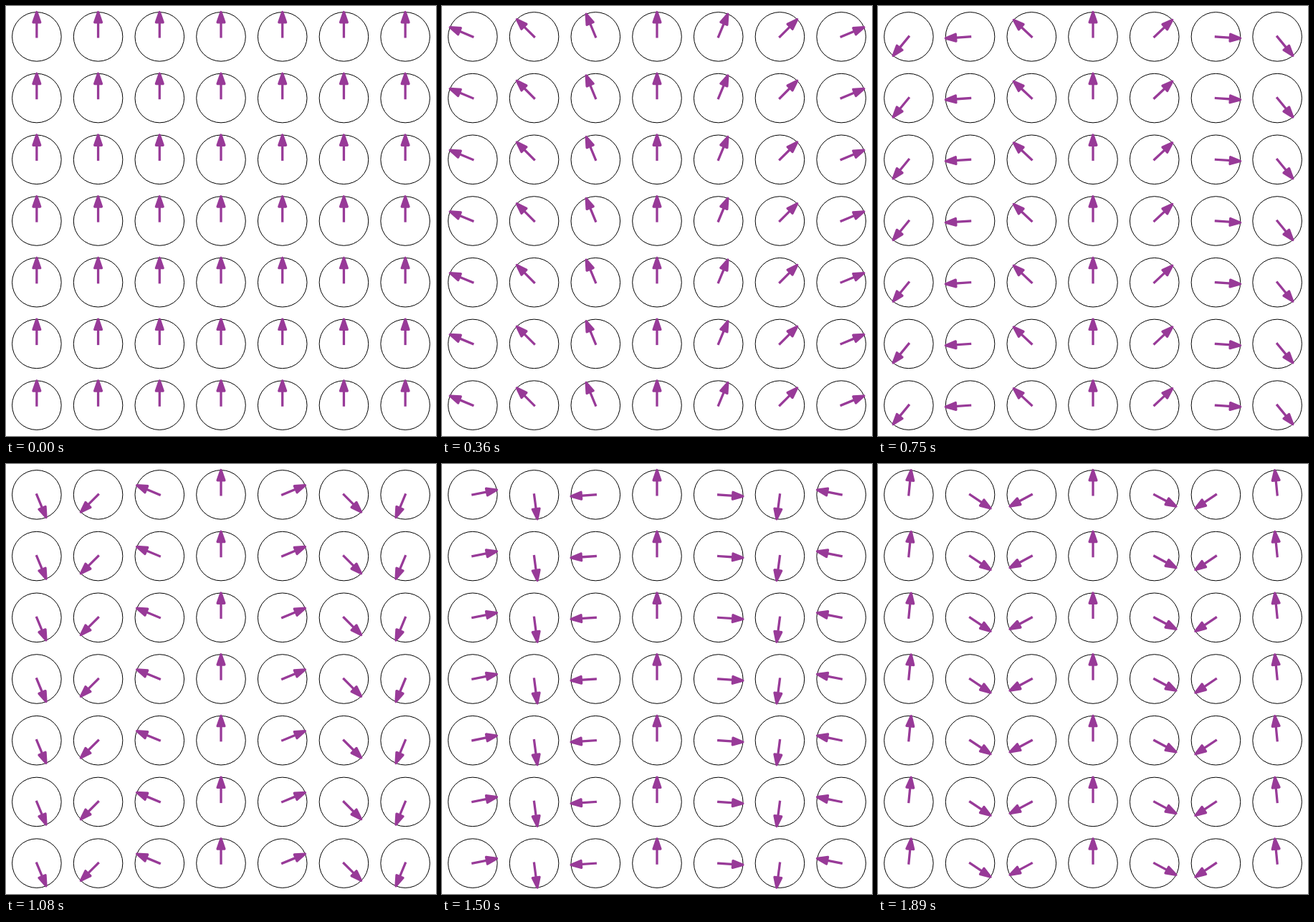
These frames come from a looping animation (600x600 px, 1920 ms). An HTML page with a canvas:

```html
<!DOCTYPE html>
<html lang="en">
<head>
<meta charset="utf-8">
<title>Rotating arrows</title>
<style>
html, body { margin: 0; width: 100%; height: 100%; overflow: hidden; background: #fff; }
canvas { display: block; width: 600px; height: 600px; }
</style>
</head>
<body>
<canvas id="stage" width="600" height="600"></canvas>
<script>
const ctx = document.getElementById('stage').getContext('2d');
const SIZE = 600, COUNT = 7, CELL = SIZE / COUNT, RADIUS = CELL * 0.4;
const STEP = 30, STEPS = 64;
const TURN = 2 * Math.PI / 3; // phase gained per column in one loop
const HEAD_BASE = 20, HEAD_HALF = 4.9;

function drawCircle() {
  ctx.beginPath();
  ctx.arc(0, 0, RADIUS, 0, 2 * Math.PI);
  ctx.lineWidth = 1;
  ctx.strokeStyle = '#000';
  ctx.stroke();
}

function drawArrow(angle) {
  ctx.rotate(angle);
  ctx.lineWidth = 3.3;
  ctx.lineCap = 'square';
  ctx.lineJoin = 'round';
  ctx.strokeStyle = ctx.fillStyle = '#983a98';
  ctx.beginPath();
  ctx.moveTo(0, 0);
  ctx.lineTo(0, -HEAD_BASE);
  ctx.stroke();
  ctx.beginPath();
  ctx.moveTo(0, -RADIUS);
  ctx.lineTo(HEAD_HALF, -HEAD_BASE);
  ctx.lineTo(-HEAD_HALF, -HEAD_BASE);
  ctx.closePath();
  ctx.fill();
  ctx.stroke();
}

function draw(now) {
  const step = Math.floor(now / STEP) % STEPS;
  const phase = TURN * step / STEPS;
  ctx.fillStyle = '#fff';
  ctx.fillRect(0, 0, SIZE, SIZE);
  for (let row = 0; row < COUNT; row++) {
    for (let col = 0; col < COUNT; col++) {
      ctx.save();
      ctx.translate((col + 0.5) * CELL, (row + 0.5) * CELL);
      drawCircle();
      drawArrow((col - (COUNT - 1) / 2) * phase);
      ctx.restore();
    }
  }
}

let start;
function tick(now) {
  start ??= now;
  draw(Math.max(0, now - start));
  requestAnimationFrame(tick);
}
draw(0);
requestAnimationFrame(tick);
</script>
</body>
</html>
```
